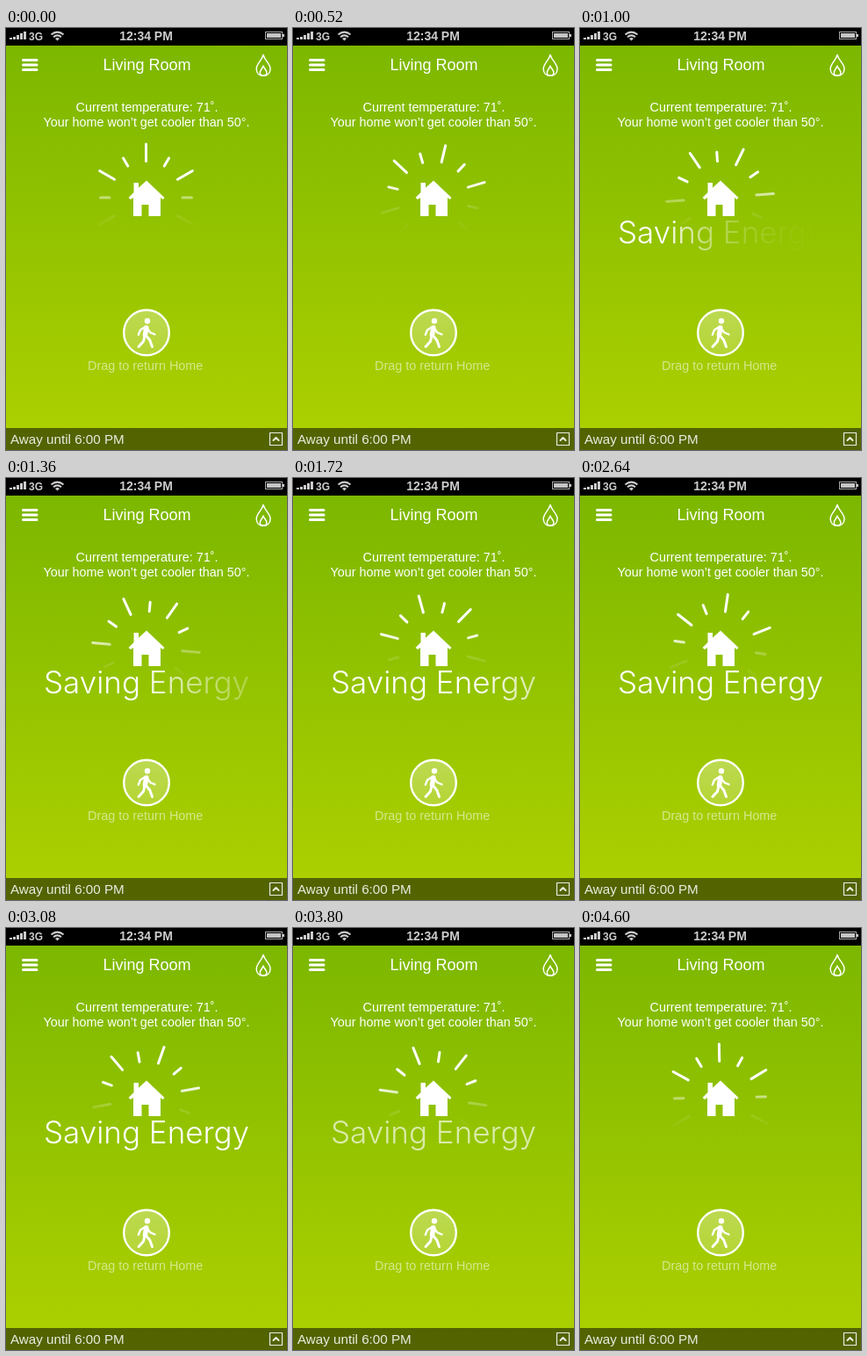
Write an HTML page that moves like this. It is 320x480 px and loops after 4640 ms.

```html
<!DOCTYPE html>
<html lang="en">
<head>
<meta charset="utf-8">
<title>Living Room</title>
<style>
  html, body { margin: 0; width: 100%; height: 100%; overflow: hidden; background: #7ab800; }
  svg { display: block; width: 320px; height: 480px; }
  text { font-family: "Liberation Sans", Arial, sans-serif; fill: #fff; }
  .mid { text-anchor: middle; }
  .line { fill: none; stroke: #fff; stroke-linecap: round; stroke-linejoin: round; }
  .status text { font-weight: bold; fill: #ccc; }
  #saving { font: 300 35px Inter, "Liberation Sans", sans-serif; fill: url(#wipe); }
</style>
</head>
<body>
<svg viewBox="0 0 320 480">
  <defs>
    <linearGradient id="sky" x2="0" y2="1">
      <stop stop-color="#7ab600"/><stop offset="1" stop-color="#aed100"/>
    </linearGradient>
    <linearGradient id="disc" x2="0" y2="1">
      <stop stop-color="#fff" stop-opacity=".32"/><stop offset="1" stop-color="#fff" stop-opacity=".2"/>
    </linearGradient>
    <linearGradient id="horizon" gradientUnits="userSpaceOnUse" x1="0" x2="0" y1="172" y2="234">
      <stop stop-color="#fff"/>
      <stop offset=".2" stop-color="#fff" stop-opacity=".85"/>
      <stop offset=".36" stop-color="#fff" stop-opacity=".4"/>
      <stop offset=".52" stop-color="#fff" stop-opacity=".14"/>
      <stop offset="1" stop-color="#fff" stop-opacity="0"/>
    </linearGradient>
    <mask id="fade" maskUnits="userSpaceOnUse" x="0" y="0" width="320" height="480">
      <path d="M90 120H230V240H90Z" fill="url(#horizon)"/>
    </mask>
    <linearGradient id="wipe" gradientUnits="userSpaceOnUse" y1="0" y2="0">
      <stop stop-color="#fff"/>
      <stop offset=".25" stop-color="#fff" stop-opacity=".5"/>
      <stop offset=".5" stop-color="#fff" stop-opacity=".2"/>
      <stop offset=".75" stop-color="#fff" stop-opacity=".07"/>
      <stop offset="1" stop-color="#fff" stop-opacity="0"/>
    </linearGradient>
  </defs>

  <rect width="320" height="480" fill="url(#sky)"/>

  <!-- status bar -->
  <g class="status">
    <rect width="320" height="20"/>
    <path d="M4 11h3v2h-3zM8 10h3v3h-3zM12 8h3v5h-3zM16 6h3v7h-3zM20 4h3v9h-3z" fill="#ccc"/>
    <text x="26" y="13.5" font-size="12">3G</text>
    <path d="M51.5 7.500Q58.500 1.800 65.500 7.500M54 10.300Q58.500 6.500 63 10.300" fill="none" stroke="#ccc" stroke-width="2"/>
    <path d="M56 12Q58.500 10 61 12L58.500 14.500Z" fill="#ccc"/>
    <text class="mid" x="159.500" y="13.500" font-size="14">12:34 PM</text>
    <rect x="295.500" y="4.500" width="19" height="8" fill="none" stroke="#aaa"/>
    <path d="M297 6h16v5h-16zM315 7h2v3h-2z" fill="#c4c4c4"/>
  </g>

  <!-- header -->
  <path class="line" stroke-width="3" d="M19.500 36.500h15.500M19.500 42h15.500M19.500 47.500h15.500"/>
  <text class="mid" x="160.500" y="48" font-size="18">Living Room</text>
  <g class="line" stroke-width="1.500">
    <path d="M293 30.500C291.500 37 285.200 40.500 285.200 46.500C285.200 51.500 288.500 54.300 293 54.300C297.500 54.300 301 51.500 301 46.500C301 40.500 294.500 37 293 30.500Z"/>
    <path d="M293 43C292 46.500 289.300 47.800 289.300 50.800C289.300 53 291 54.300 293 54.300C295 54.300 296.900 53 296.900 50.800C296.900 47.800 294 46.500 293 43Z"/>
  </g>
  <g class="mid" font-size="14.350">
    <text x="160.500" y="94.500">Current temperature: 71˚.</text>
    <text x="160" y="112">Your home won’t get cooler than 50°.</text>
  </g>

  <!-- house with turning rays -->
  <g mask="url(#fade)"><g id="rays" class="line" stroke-width="3"></g></g>
  <path fill="#fff" d="M160 173.500L180.500 193L178.500 195L176 193V214H162.500V201H154.500V214H145V193L142 195L139.500 193L145.500 187V176H151V181.800Z"/>
  <text id="saving" class="mid" x="160" y="245">Saving Energy</text>

  <!-- walker button -->
  <circle cx="160" cy="346.500" r="25.800" fill="url(#disc)" stroke="#fff" stroke-width="2.400"/>
  <circle cx="161" cy="333.300" r="3.200" fill="#fff"/>
  <g class="line" stroke-width="2.400">
    <path d="M158.500 340L153 343.500L150.800 349M161 342L164.500 346.500L169.500 348.500"/>
    <path stroke-width="5.500" d="M159.800 341L158.500 349"/>
    <path stroke-width="3" d="M158 350L156.500 356.500L151 362.500M159.500 350L163.800 355L166.500 362.500"/>
  </g>
  <text class="mid" x="158.700" y="388.500" font-size="14.400" fill-opacity=".55">Drag to return Home</text>

  <!-- footer -->
  <rect y="455" width="320" height="25" fill-opacity=".52"/>
  <g opacity=".88">
    <text x="5" y="472.500" font-size="15.200">Away until 6:00 PM</text>
    <rect class="line" x="300.500" y="460.500" width="14" height="14" stroke-width="1.200"/>
    <path class="line" stroke-width="2" d="M304.500 469L307.500 466L310.500 469"/>
  </g>
</svg>
<script>
  const LOOP = 4640, STEP = 40;
  const $ = id => document.getElementById(id);
  const rays = $('rays'), saving = $('saving'), wipe = $('wipe');

  for (let i = 0; i < 12; i++) {
    const ray = document.createElementNS('http://www.w3.org/2000/svg', 'path');
    ray.setAttribute('d', `M0-41.500V${i % 2 ? -52 : -61}`);
    ray.setAttribute('transform', `rotate(${i * 30})`);
    rays.append(ray);
  }

  function draw(now) {
    const t = Math.floor(now % LOOP / STEP) * STEP;
    rays.setAttribute('transform', `translate(159.500 193) rotate(${120 * t / LOOP})`);

    // the solid edge trails the faint leading edge
    const solid = 40 + 0.147 * (t - 620);
    const front = Math.max(solid + 1, 40 + 0.48 * (t - 520));
    wipe.setAttribute('x1', solid);
    wipe.setAttribute('x2', front);
    saving.setAttribute('opacity', Math.max(0, Math.min(1, (4600 - t) / 1200)));
    requestAnimationFrame(draw);
  }
  draw(0);
</script>
</body>
</html>
```
